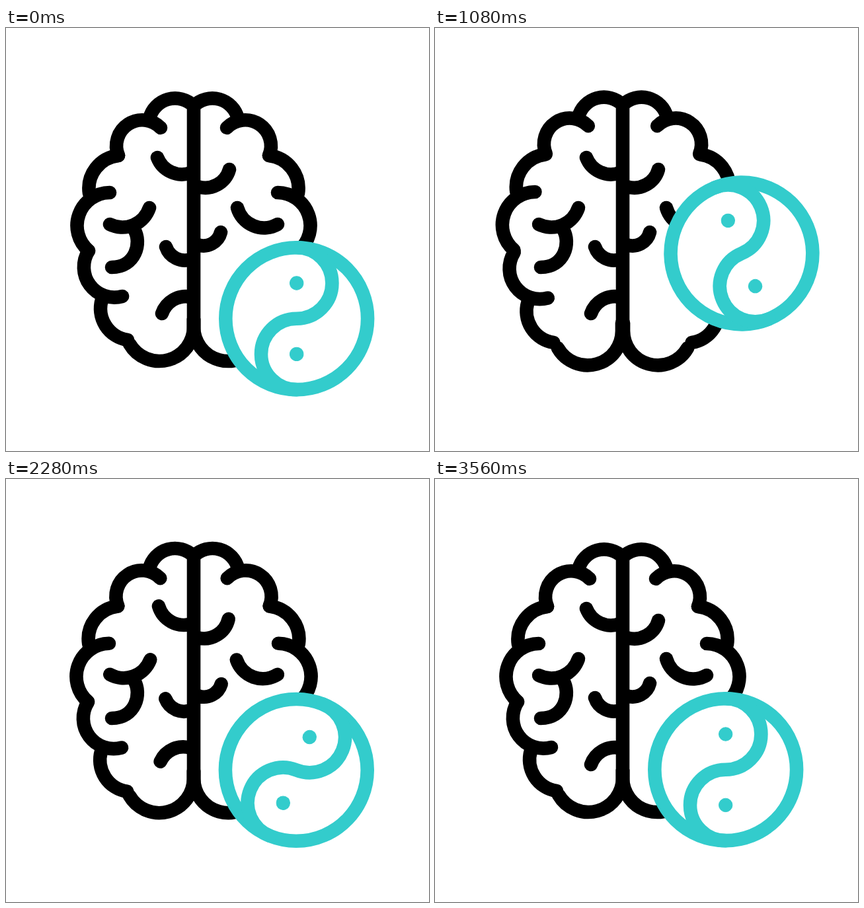
Recreate the animation shown at these times as an HTML page without scripts. Size 640 by 640 pixels, loop 3600 ms.

```html
<!DOCTYPE html>
<html lang="en">
<head>
<meta charset="utf-8">
<title>Balanced mind</title>
<style>
  html, body { margin: 0; width: 100%; height: 100%; overflow: hidden; background: #fff; }
  svg { display: block; width: 100vw; height: 100vh; }
  path, line { fill: none; stroke: #000; stroke-width: 20.6; stroke-linecap: round; stroke-linejoin: round; }
  .lobe, .fold, .badge, .badge g, .spark path {
    animation: 3.6s cubic-bezier(.37, 0, .63, 1) infinite;
  }

  /* Lobes of one half, from crown to base; they swell along (--x, --y), the top first */
  .lobe { --out: calc(var(--x) * 1px) calc(var(--y) * 1px); }
  .crown { --x: -1; --y: -8.5; d: path("M217 137A40 40 0 0 1 284 118"); }
  .brow { --x: -5; --y: -6.5; d: path("M234 151A39 39 0 0 0 170 193"); }
  .temple { --x: -6; --y: -4; d: path("M170 193A50 50 0 0 0 126 250"); }
  .side { --x: -8; --y: -1.5; d: path("M157 249A50 50 0 0 0 125 337"); }
  .cheek { --x: -7.5; --y: 3.5; d: path("M125 337A46 46 0 0 0 176 406"); }
  .jaw { --x: -6.5; --y: 5.5; d: path("M145 411A48 48 0 0 0 184 472"); }
  .base { --x: -1.5; --y: 9; d: path("M187 478A52 52 0 0 0 284 451V440"); }
  .top { animation-name: swell-top; }
  .mid { animation-name: swell-mid; }
  .low { animation-name: swell-low; }
  @keyframes swell-top {
    0%, 4.2%, 34.2%, 59.4%, 92.2%, 100% { translate: 0 0; }
    20.5%, 50%, 73.9% { translate: var(--out); }
  }
  @keyframes swell-mid {
    0%, 6.4%, 36.7%, 59.7%, 93.9%, 100% { translate: 0 0; }
    22.2%, 50%, 75% { translate: var(--out); }
  }
  @keyframes swell-low {
    0%, 7.8%, 40.5%, 59.2%, 95%, 100% { translate: 0 0; }
    23.9%, 51.1%, 76.7% { translate: var(--out); }
  }

  .fold { animation-name: sway; }
  @keyframes sway {
    0%, 30%, 58.6%, 92.2%, 100% { rotate: 0deg; }
    17.5%, 44.7%, 71.1% { rotate: var(--r); }
  }

  .badge path, .badge circle { stroke: #3cc; }
  .ring { fill: #fff; stroke-width: 20.6; }
  .dot { fill: #3cc; stroke: none; }
  .badge { animation-name: rise; }
  .badge .drift { animation-name: drift; }
  .badge .tilt { animation-name: tilt; }
  @keyframes rise {
    0%, 10% { translate: 0 0; }
    19.2% { translate: 0 17.3px; }
    33.1% { translate: 0 -113.7px; animation-timing-function: cubic-bezier(.4, 0, .7, .75); }
    43.9% { translate: 0 -55.7px; animation-timing-function: cubic-bezier(.3, .4, .7, .72); }
    60% { translate: 0 -8.2px; animation-timing-function: cubic-bezier(.61, 1, .88, 1); }
    68.6% { translate: 0 7.3px; }
    80.3% { translate: 0 -3.4px; }
    90.3%, 100% { translate: 0 0; }
  }
  @keyframes drift {
    0%, 13.3%, 70%, 100% { translate: 0 0; }
    22.8% { translate: 39px 0; }
    38.3% { translate: 6px 0; }
    63.3% { translate: -.4px 0; }
  }
  @keyframes tilt {
    0%, 91.7%, 100% { rotate: 0deg; }
    24.6% { rotate: -30deg; }
    48.1% { rotate: 30deg; }
  }

  .spark path { stroke: #3cc; animation-name: shoot; animation-timing-function: linear; }
  @keyframes shoot {
    0%, 71.6% { visibility: hidden; stroke-dasharray: 0 90; stroke-dashoffset: 0; }
    71.7% { visibility: visible; stroke-dasharray: 0 90; stroke-dashoffset: 0; }
    75% { stroke-dasharray: 14 90; stroke-dashoffset: 0; }
    81.1% { stroke-dasharray: 10 90; stroke-dashoffset: -16.5; }
    83.5% { stroke-dasharray: 7 90; stroke-dashoffset: -22.9; }
    86.7% { visibility: visible; stroke-dasharray: .1 90; stroke-dashoffset: -29.8; }
    86.8%, 100% { visibility: hidden; stroke-dasharray: 0 90; stroke-dashoffset: -30; }
  }
</style>
</head>
<body>
<svg viewBox="0 0 640 640">
  <g>
    <path class="lobe top crown"/>
    <path class="lobe mid brow"/>
    <path class="lobe mid temple"/>
    <path class="lobe low side"/>
    <path class="lobe low cheek"/>
    <path class="lobe low jaw"/>
    <path class="lobe low base"/>
  </g>
  <g transform="matrix(-1 0 0 1 568 0)">
    <path class="lobe top crown"/>
    <path class="lobe mid brow"/>
    <path class="lobe mid temple"/>
    <path class="lobe low side"/>
    <path class="lobe low cheek"/>
    <path class="lobe low jaw"/>
    <path class="lobe low base"/>
  </g>
  <line x1="284" y1="118" x2="284" y2="468"/>

  <path class="fold" style="--r:15deg;transform-origin:274px 218px" d="M229 196A40 40 0 0 0 280 219"/>
  <path class="fold" style="--r:-9deg;transform-origin:294px 240px" d="M338 214A38 38 0 0 1 290 240"/>
  <path class="fold" style="--r:-8deg;transform-origin:274px 348px" d="M242 331A30 30 0 0 0 280 350"/>
  <path class="fold" style="--r:7deg;transform-origin:294px 328px" d="M325 309A27 27 0 0 1 290 328"/>
  <path class="fold" style="--r:19deg;transform-origin:278px 407px" d="M236 432A38 38 0 0 1 280 407"/>
  <path class="fold" style="--r:-8deg;transform-origin:384px 300px" d="M350 272A42 42 0 0 0 411 297"/>
  <path class="fold" style="--r:8deg;transform-origin:185px 302px" d="M157 297A43 43 0 0 0 217 272"/>
  <path d="M194 305C206 325 196 362 160 362"/>

  <g class="spark">
    <path d="M140 116.4L134.2 87"/>
    <path d="M108.8 139L85.7 120.1"/>
    <path d="M102.6 172.7L73 177.4"/>
    <path d="M442.8 118.8L445.8 89"/>
    <path d="M473 138.7L496.3 119.6"/>
    <path d="M482.8 172L512.5 176.4"/>
  </g>

  <g transform="translate(439.7 439.7)">
    <g class="badge">
      <g class="drift">
        <g class="tilt" style="transform-origin:0 0">
          <circle class="ring" r="107.4"/>
          <path d="M0-107.4A53.7 53.7 0 0 1 0 0A53.7 53.7 0 0 0 0 107.4"/>
          <circle class="dot" cy="-53.7" r="10.2"/>
          <circle class="dot" cy="53.7" r="10.2"/>
        </g>
      </g>
    </g>
  </g>
</svg>
</body>
</html>
```
